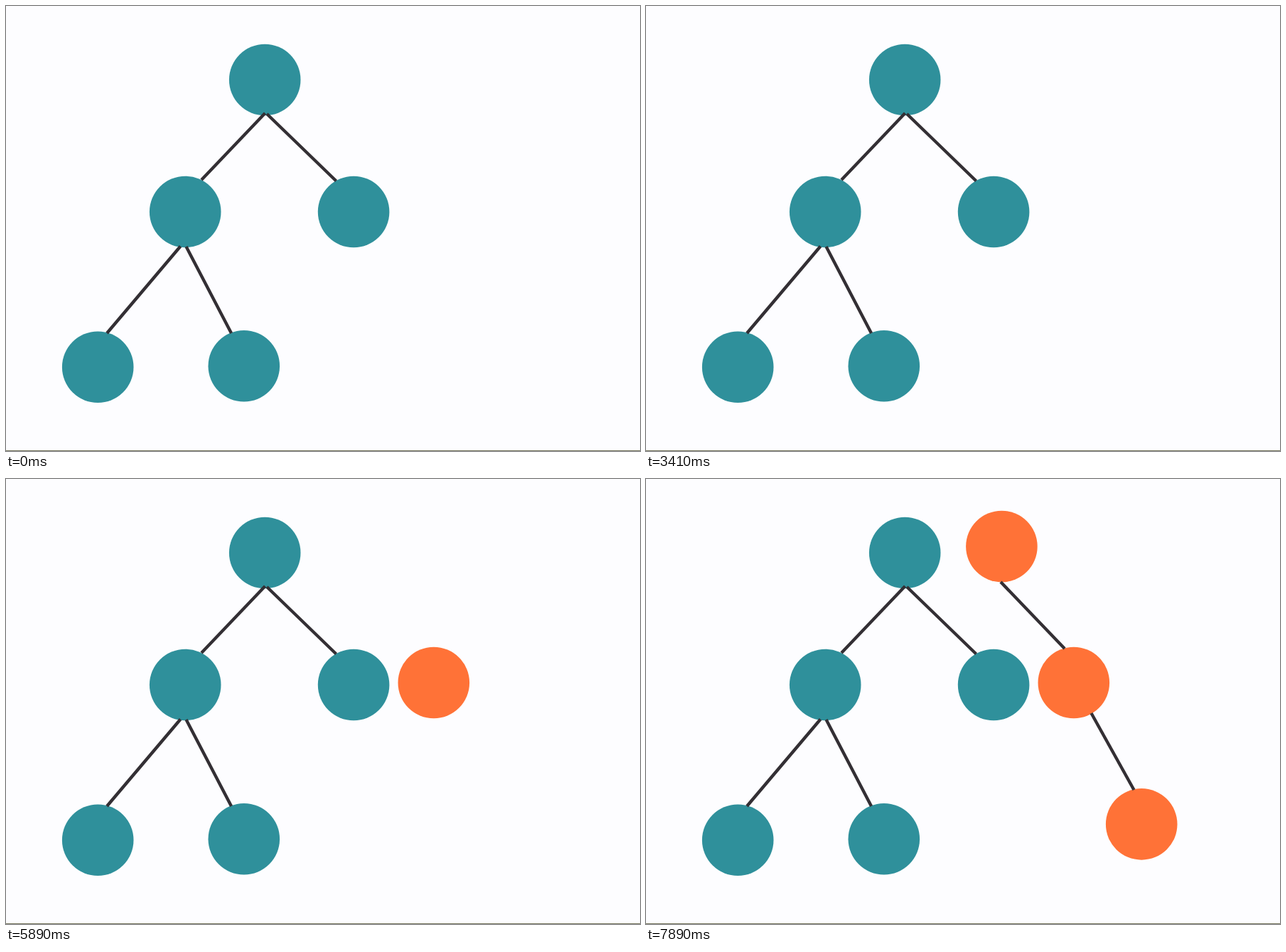
Animation, 892 px wide and 627 px high, one loop 7990 ms. Source, as an HTML page:

```html
<!DOCTYPE html>
<html lang="en">
<head>
<meta charset="utf-8">
<title>Tree traversal</title>
<style>
  html, body { margin: 0; width: 100%; height: 100%; overflow: hidden; background: #fdfdff; }
  svg { display: block; width: 100%; height: 100%; }
  line { stroke: #332f34; stroke-width: 4.4; }
  .teal { fill: #2f909b; }
  .orange { fill: #ff7237; }
</style>
</head>
<body>
<svg id="stage" viewBox="0 0 892 627">
  <rect y="626" width="892" height="1" fill="#74745c"/>
</svg>
<script>
const LOOP = 7990;
const stage = document.getElementById('stage');

function add(parent, tag, attributes) {
  const element = document.createElementNS('http://www.w3.org/2000/svg', tag);
  for (const [name, value] of Object.entries(attributes)) element.setAttribute(name, value);
  parent.append(element);
  return element;
}

const node = (parent, color, cx, cy) => add(parent, 'circle', { class: color, cx, cy, r: 50.3 });
const edge = (parent, x1, y1, x2, y2) => add(parent, 'line', { x1, y1, x2, y2 });

// The fixed tree
for (const [x, y] of [[364.2, 104], [252.2, 290], [489.1, 290], [129.2, 508.8], [334.8, 507.2]])
  node(stage, 'teal', x, y);
edge(stage, 364.5, 151, 275, 245);
edge(stage, 367, 152, 464.5, 246.5);
edge(stage, 245.5, 338.5, 142, 461);
edge(stage, 253.5, 339, 317, 461);

// Parts of the second tree, each shown from its start time to the end of the loop
const steps = [
  { start: 3790, center: [601.8, 287] },
  { start: 6310, center: [697.2, 486.4], link: [626.5, 330, 686.5, 438] },
  { start: 7150, center: [500.4, 95], link: [499, 145, 589, 239] }
];
for (const step of steps) {
  step.group = add(stage, 'g', { visibility: 'hidden' });
  node(step.group, 'orange', ...step.center);
  if (step.link) edge(step.group, ...step.link);
}

function draw() {
  const time = performance.now() % LOOP;
  for (const { group, start } of steps)
    group.setAttribute('visibility', time >= start ? 'visible' : 'hidden');
  requestAnimationFrame(draw);
}
draw();
</script>
</body>
</html>
```
